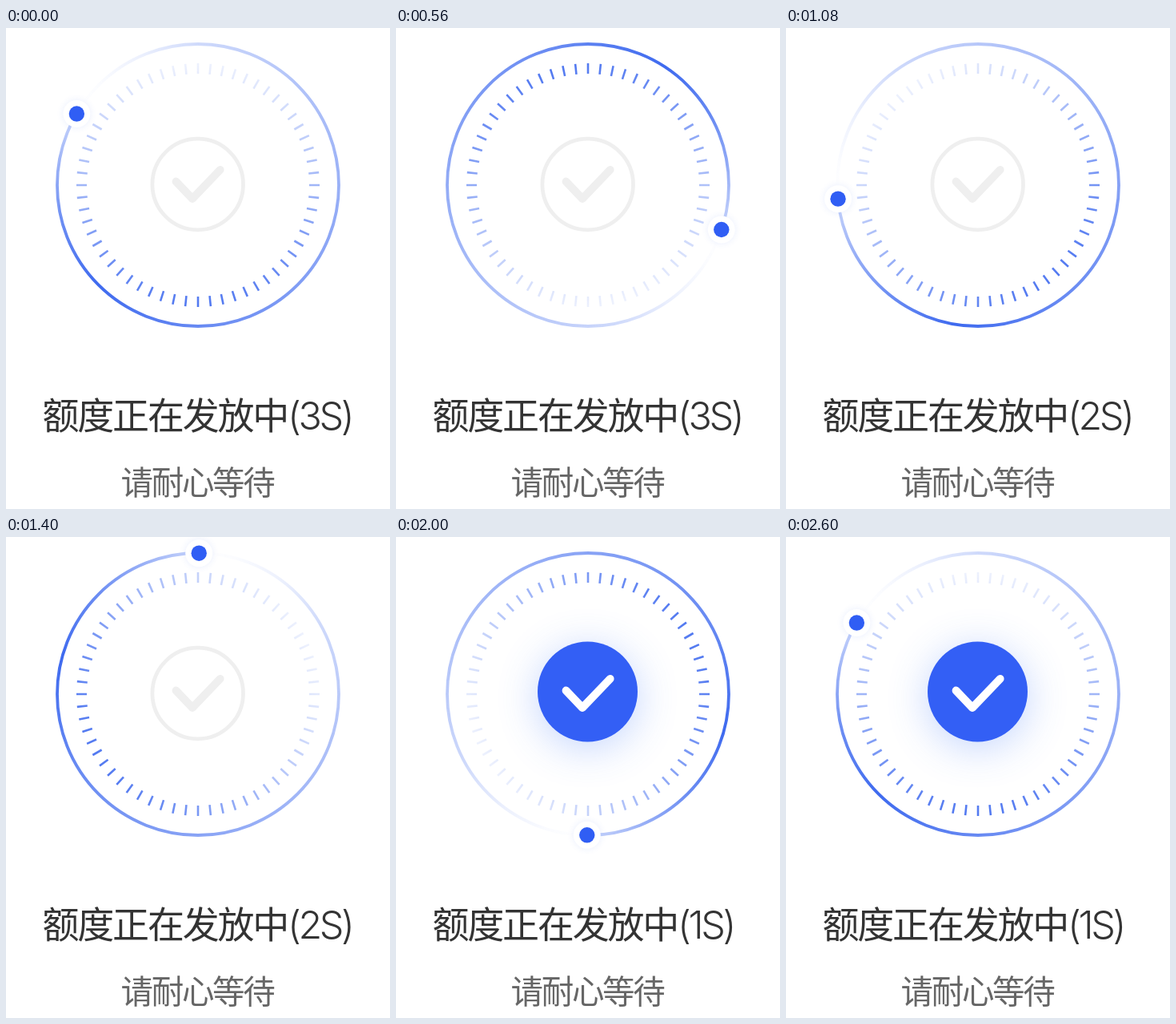
An HTML page with a canvas for the animation above (3000 ms loop, 480x600 px).

```html
<!DOCTYPE html>
<html lang="zh">
<head>
<meta charset="utf-8">
<style>
  html, body { margin: 0; width: 100%; height: 100%; overflow: hidden; background: #fff; }
  canvas { display: block; }
</style>
</head>
<body>
<canvas id="stage" width="480" height="600"></canvas>
<script>
const ctx = document.getElementById('stage').getContext('2d');
const TAU = Math.PI * 2;
const LOOP = 3000, STEP = 40, BRAKE = 2200, LAST = 2600;
const CX = 240, CY = 196, RING = 176;
const START = 300.4, SPEED = .3; // degrees, degrees per ms
const BLUE = '#305ef4';
const CJK = '"Noto Sans CJK SC", "Noto Sans CJK", sans-serif';
// Ring opacity by degrees clockwise from the dot
const TAIL = [[0, 0], [15, .02], [35, .09], [60, .24], [90, .34], [150, .5], [240, .75], [285, .95], [315, .72], [335, .52], [360, .26]];

const blue = alpha => `rgba(52, 98, 238, ${alpha})`;
const clamp = v => Math.max(0, Math.min(1, v));
// Angle in degrees, clockwise from the top
const polar = (deg, r) => {
  const a = deg * Math.PI / 180;
  return [CX + r * Math.sin(a), CY - r * Math.cos(a)];
};

function disc(x, y, r, fill) {
  ctx.beginPath();
  ctx.arc(x, y, r, 0, TAU);
  ctx.fillStyle = fill;
  ctx.fill();
}

function shadowDisc(x, y, r, fill, color, blur, dy) {
  ctx.save();
  ctx.shadowColor = color;
  ctx.shadowBlur = blur;
  ctx.shadowOffsetY = dy;
  disc(x, y, r, fill);
  ctx.restore();
}

// Steady turn that brakes evenly to a stop
function dotAngle(t) {
  const span = LAST - BRAKE;
  const braking = Math.max(0, t - BRAKE);
  return START + SPEED * (t - braking * braking / (2 * span));
}

function drawTicks(angle) {
  const shade = ctx.createLinearGradient(...polar(angle + 60, 150), ...polar(angle + 240, 150));
  shade.addColorStop(0, blue(.09));
  shade.addColorStop(.5, blue(.47));
  shade.addColorStop(1, blue(.85));
  ctx.beginPath();
  for (let deg = 0; deg < 360; deg += 6) {
    ctx.moveTo(...polar(deg, 139));
    ctx.lineTo(...polar(deg, 152));
  }
  ctx.strokeStyle = shade;
  ctx.lineWidth = 2.6;
  ctx.lineCap = 'butt';
  ctx.stroke();
}

function drawRing(angle) {
  const shade = ctx.createConicGradient((angle - 90) * Math.PI / 180, CX, CY);
  for (const [deg, alpha] of TAIL) shade.addColorStop(deg / 360, blue(alpha));
  ctx.beginPath();
  ctx.arc(CX, CY, RING, 0, TAU);
  ctx.strokeStyle = shade;
  ctx.lineWidth = 3.8;
  ctx.stroke();

  const [x, y] = polar(angle, 175.8);
  shadowDisc(x, y, 17, '#fff', blue(.11), 8, 0);
  disc(x, y, 9.7, BLUE);
}

function drawCheck(color) {
  ctx.beginPath();
  ctx.moveTo(212.5, 191.5);
  ctx.lineTo(233, 213);
  ctx.lineTo(267.7, 176.8);
  ctx.strokeStyle = color;
  ctx.lineWidth = 9.8;
  ctx.lineCap = ctx.lineJoin = 'round';
  ctx.stroke();
}

function drawBadge(t) {
  const idle = 1 - clamp((t - 1400) / 200);
  const scale = clamp((t - 1400) / 500);
  if (idle > 0) {
    ctx.globalAlpha = idle;
    ctx.beginPath();
    ctx.arc(239.7, 195, 56.8, 0, TAU);
    ctx.strokeStyle = '#efefef';
    ctx.lineWidth = 4.8;
    ctx.stroke();
    drawCheck('#efefef');
    ctx.globalAlpha = 1;
  }
  if (scale > 0) {
    shadowDisc(239.5, 198 - 5 * scale, 62.5 * scale, '#335ff5', 'rgba(60, 115, 250, .3)', 50 * scale, 8 * scale);
    drawCheck('#fff');
  }
}

function text(str, x, y, font, color, spacing) {
  ctx.font = font;
  ctx.letterSpacing = spacing + 'px';
  ctx.fillStyle = color;
  ctx.fillText(str, x, y);
}

function drawText(t) {
  const seconds = 3 - Math.floor(t / 1000);
  text('额度正在发放中', 45.5, 500, '46px ' + CJK, '#333', -2.2);
  text(`(${seconds}S)`, 352, 500.5, '350 48.5px Inter, sans-serif', '#333', -3.4);
  text('请耐心等待', 143.5, 581.5, '40.5px ' + CJK, '#666', -2.3);
}

function draw(t) {
  const angle = dotAngle(t);
  ctx.clearRect(0, 0, 480, 600);
  drawTicks(angle);
  drawRing(angle);
  drawBadge(t);
  drawText(t);
}

function frame() {
  const t = performance.now() % LOOP;
  draw(Math.min(LAST, Math.floor(t / STEP) * STEP));
  requestAnimationFrame(frame);
}
frame();
</script>
</body>
</html>
```
